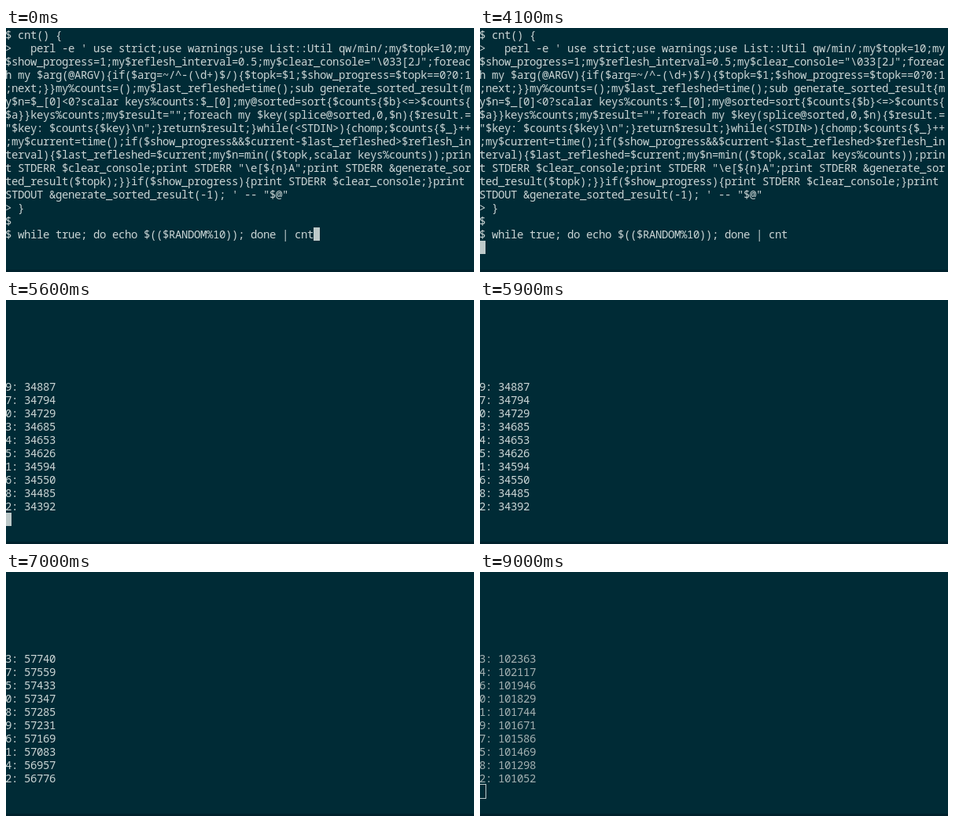
Recreate the animation shown at these times as an HTML page. Size 595x312 px, loop 9.1 s.

```html
<!DOCTYPE html>
<html lang="en">
<head>
<meta charset="utf-8">
<title>Terminal counter</title>
<style>
html, body { margin: 0; width: 100%; height: 100%; overflow: hidden; background: #002b36; }
svg { display: block; width: 595px; height: 312px; }
text {
  font: 14px "Noto Sans Mono", "DejaVu Sans Mono", monospace;
  letter-spacing: -0.4px;
  white-space: pre;
}
</style>
</head>
<body>
<svg id="stage" viewBox="0 0 595 312">
  <rect width="595" height="312" fill="#002b36"/>
  <rect y="309" width="595" height="3" fill="#00222d"/>
  <g id="shell" fill="#cbd5d5"></g>
  <g id="counts" fill="#cbd5d5"></g>
  <rect id="block" width="8" height="17" fill="#bdc9c9"/>
  <rect id="hollow" x="-1.5" y="271.5" width="9" height="18" fill="none" stroke="#bdc9c9"/>
</svg>
<script>
const LOOP = 9100, ENTER = 4100, START = 4600, BLUR = 9000;
const COLS = 74, CELL = 8, ROW = 17;
const $ = id => document.getElementById(id);
const shell = $('shell'), counts = $('counts'), block = $('block'), hollow = $('hollow');

const script = String.raw`>   perl -e ' use strict;use warnings;use List::Util qw/min/;my$topk=10;my`
  + String.raw`$show_progress=1;my$reflesh_interval=0.5;my$clear_console="\033[2J";foreac`
  + String.raw`h my $arg(@ARGV){if($arg=~/^-(\d+)$/){$topk=$1;$show_progress=$topk==0?0:1`
  + String.raw`;next;}}my%counts=();my$last_refleshed=time();sub generate_sorted_result{m`
  + String.raw`y$n=$_[0]<0?scalar keys%counts:$_[0];my@sorted=sort{$counts{$b}<=>$counts{`
  + String.raw`$a}}keys%counts;my$result="";foreach my $key(splice@sorted,0,$n){$result.=`
  + String.raw`"$key: $counts{$key}\n";}return$result;}while(<STDIN>){chomp;$counts{$_}++`
  + String.raw`;my$current=time();if($show_progress&&$current-$last_refleshed>$reflesh_in`
  + String.raw`terval){$last_refleshed=$current;my$n=min(($topk,scalar keys%counts));prin`
  + 't STDERR $clear_console;print STDERR "\\e[${n}A";print STDERR &generate_sor'
  + String.raw`ted_result($topk);}}if($show_progress){print STDERR $clear_console;}print `
  + String.raw`STDOUT &generate_sorted_result(-1); ' -- "$@"`;

const wrap = s => Array.from({ length: Math.ceil(s.length / COLS) },
  (_, i) => s.slice(i * COLS, (i + 1) * COLS));

function addLine(parent, row, str) {
  const t = document.createElementNS('http://www.w3.org/2000/svg', 'text');
  t.setAttribute('x', -1);
  t.setAttribute('y', row * ROW + 14);
  t.textContent = str;
  parent.appendChild(t);
  return t;
}

['$ cnt() {', ...wrap(script), '> }', '$',
  '$ while true; do echo $(($RANDOM%10)); done | cnt'].forEach((s, i) => addLine(shell, i, s));
const rows = Array.from({ length: 10 }, (_, i) => addLine(counts, 6 + i, ''));

// Each refresh: digits by rank, then the highest and lowest total.
const refreshes = [
  ['0794352816', 11679, 11469],
  ['9703451682', 34887, 34392],
  ['3750896142', 57740, 56776],
  ['3704519682', 80051, 78914],
  ['3460197582', 102363, 101052]
];

// Totals bunch up around the middle ranks.
function ranking([order, high, low]) {
  return [...order].map((digit, i) => {
    const u = 1 - 2 * i / 9;
    const total = (high + low) / 2 + (high - low) / 4 * (u + u ** 3);
    return digit + ': ' + Math.round(total);
  });
}
const tables = refreshes.map(ranking);

const show = (el, on) => el.setAttribute('visibility', on ? 'visible' : 'hidden');

// Enter restarts the blink.
const cursorLit = t => (t < ENTER
  ? Math.floor((t + 300) / 600)
  : Math.floor((t - 4010) / 598)) % 2 === 0;

function draw(t) {
  const entered = t >= ENTER, running = t >= START, blurred = t >= BLUR;
  show(shell, !running);
  show(counts, running);
  if (running) {
    const table = tables[Math.floor((t - START) / 1000)];
    rows.forEach((r, i) => { r.textContent = table[i]; });
  }
  counts.setAttribute('fill', blurred ? '#a3b0b1' : '#cbd5d5');

  block.setAttribute('x', (entered ? 0 : 49) * CELL - 1);
  block.setAttribute('y', (entered ? 16 : 15) * ROW);
  show(block, cursorLit(t) && !blurred);
  show(hollow, blurred);
}

const begin = performance.now();
function tick() {
  draw((performance.now() - begin) % LOOP);
  requestAnimationFrame(tick);
}
draw(0);
requestAnimationFrame(tick);
</script>
</body>
</html>
```
